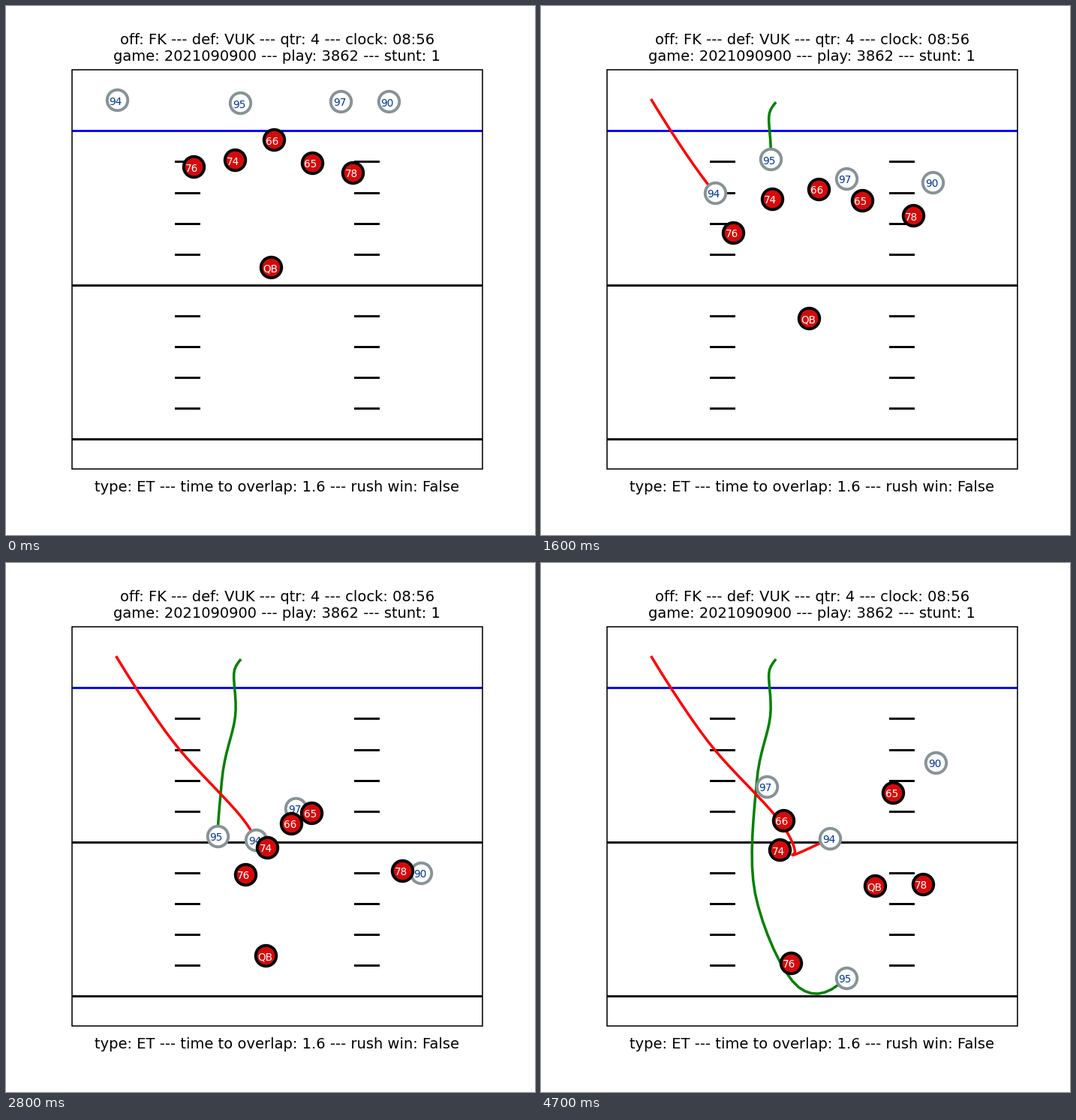
Recreate the animation shown at these times as a matplotlib script. Size 705 by 705 pixels, loop 4800 ms.

```python
import numpy as np
import matplotlib.pyplot as plt
from matplotlib.animation import FuncAnimation
from matplotlib.patches import Rectangle

SIZE, DPI, FRAMES = 705, 140, 48
LEFT, TOP, RIGHT, BOTTOM = 88.1, 84.6, 634.6, 616.9
SCRIMMAGE, YARD = 166.42, 41.06

TITLE = ("off: FK --- def: VUK --- qtr: 4 --- clock: 08:56\n"
         "game: 2021090900 --- play: 3862 --- stunt: 1")
CAPTION = "type: ET --- time to overlap: 1.6 --- rush win: False"

plt.rcParams["font.family"] = "DejaVu Sans"

# Everyone rests until the snap, then passes one key point per beat.
BEATS = (4, 16, 24, 32, 40, 47)
RUSH = {
    "94": [(147.5, 125.5), (231.5, 249), (314.5, 339.5), (338.5, 385.5), (343.5, 386.5), (385, 367)],
    "95": [(312, 129.5), (305.5, 204.5), (287.5, 291.5), (285.5, 441), (343.5, 565.5), (406.5, 553)],
    "97": [(446, 127), (406.5, 230), (398, 304), (369, 341.5), (316.5, 349), (300.5, 298)],
    "90": [(509.5, 127.5), (522, 235), (544, 368.5), (558.5, 431.5), (548, 361), (526, 266)],
}
BLOCK = {
    "76": [(249.5, 214.5), (256, 302), (308.5, 379), (320.5, 449.5), (308.5, 516), (332.5, 533)],
    "74": [(304.5, 205.5), (307.5, 257), (339, 339), (349, 408), (315.5, 403), (318, 382.5)],
    "66": [(356.5, 178.5), (369.5, 244), (379, 319), (376, 366.5), (344.5, 369), (322.5, 343)],
    "65": [(407.5, 209), (427.5, 259), (417.5, 314), (400.5, 346), (418.5, 353), (469, 306)],
    "78": [(462, 222), (495.5, 279.5), (518, 358), (534, 453), (524.5, 463.5), (508.5, 428)],
    "QB": [(352.5, 348.5), (356.5, 416.5), (349, 489.5), (350.5, 543), (405.5, 508), (444.5, 430)],
}
# Sharp cuts made by the two stunting rushers
CUTS = {"95": {8: (304.5, 142.5)}, "94": {35: (335, 389)}}


def smooth_path(points, cuts):
    """Sample a cubic Hermite curve that starts at rest, one row per frame."""
    keys = sorted({**dict(zip(BEATS, points)), **cuts}.items())
    t = np.array([time for time, _ in keys], float)
    p = np.array([point for _, point in keys], float)
    slope = np.gradient(p, t, axis=0, edge_order=2)
    slope[0] = 0
    frame = np.clip(np.arange(FRAMES), t[0], t[-1])
    i = np.clip(np.searchsorted(t, frame, side="right") - 1, 0, len(t) - 2)
    span = (t[i + 1] - t[i])[:, None]
    s = (frame - t[i])[:, None] / span
    return (p[i] * (1 + 2 * s) * (1 - s) ** 2
            + slope[i] * span * s * (1 - s) ** 2
            + p[i + 1] * s ** 2 * (3 - 2 * s)
            + slope[i + 1] * span * s ** 2 * (s - 1))


inches = (SIZE + 1e-6) / DPI  # keeps the pixel size from rounding down
fig = plt.figure(figsize=(inches, inches), dpi=DPI, facecolor="white")
ax = fig.add_axes([0, 0, 1, 1])
ax.set(xlim=(0, SIZE), ylim=(SIZE, 0))
ax.axis("off")


def rule(x0, x1, y, color="black"):
    ax.plot([x0, x1], [y, y], color=color, lw=1.5, zorder=1)


def draw_field():
    for k in range(11):
        y = SCRIMMAGE + k * YARD
        if k % 5 == 0:
            rule(LEFT + 1, RIGHT - 2, y, "black" if k else "blue")
        else:
            for x in (226, 465):
                rule(x, x + 31, y)
    ax.add_patch(Rectangle((LEFT, TOP), RIGHT - LEFT, BOTTOM - TOP,
                           fill=False, lw=0.8, zorder=2))
    middle = (LEFT + RIGHT) / 2
    for y, text in ((73.4, TITLE), (647, CAPTION)):
        ax.text(middle, y, text, size=10, ha="center", va="baseline")


class Player:
    def __init__(self, name, points, face, edge, ink, z):
        self.path = smooth_path(points, CUTS.get(name, {}))
        self.dot, = ax.plot([], [], "o", ms=200 ** 0.5, mew=2,
                            mfc=face, mec=edge, zorder=z)
        self.label = ax.text(0, 0, name, size=7, color=ink, zorder=z + 0.5)

    def move(self, frame):
        x, y = self.path[frame]
        self.dot.set_data([x], [y])
        self.label.set_position((x - YARD / 4, y + 0.15 * YARD))


draw_field()
players = {}
for team, style in ((RUSH, ("white", "#869397", "#003594")),
                    (BLOCK, ("#d50a0a", "black", "white"))):
    for name, points in team.items():
        players[name] = Player(name, points, *style, z=10 + len(players))

trails = {name: ax.plot([], [], color=color, lw=1.8, zorder=z)[0]
          for name, color, z in (("95", "green", 4), ("94", "red", 5))}


def update(frame):
    for player in players.values():
        player.move(frame)
    for name, line in trails.items():
        line.set_data(*players[name].path[:frame + 1].T)
    return []


anim = FuncAnimation(fig, update, frames=FRAMES, interval=100,
                     repeat=True, repeat_delay=0)
plt.show()
```
